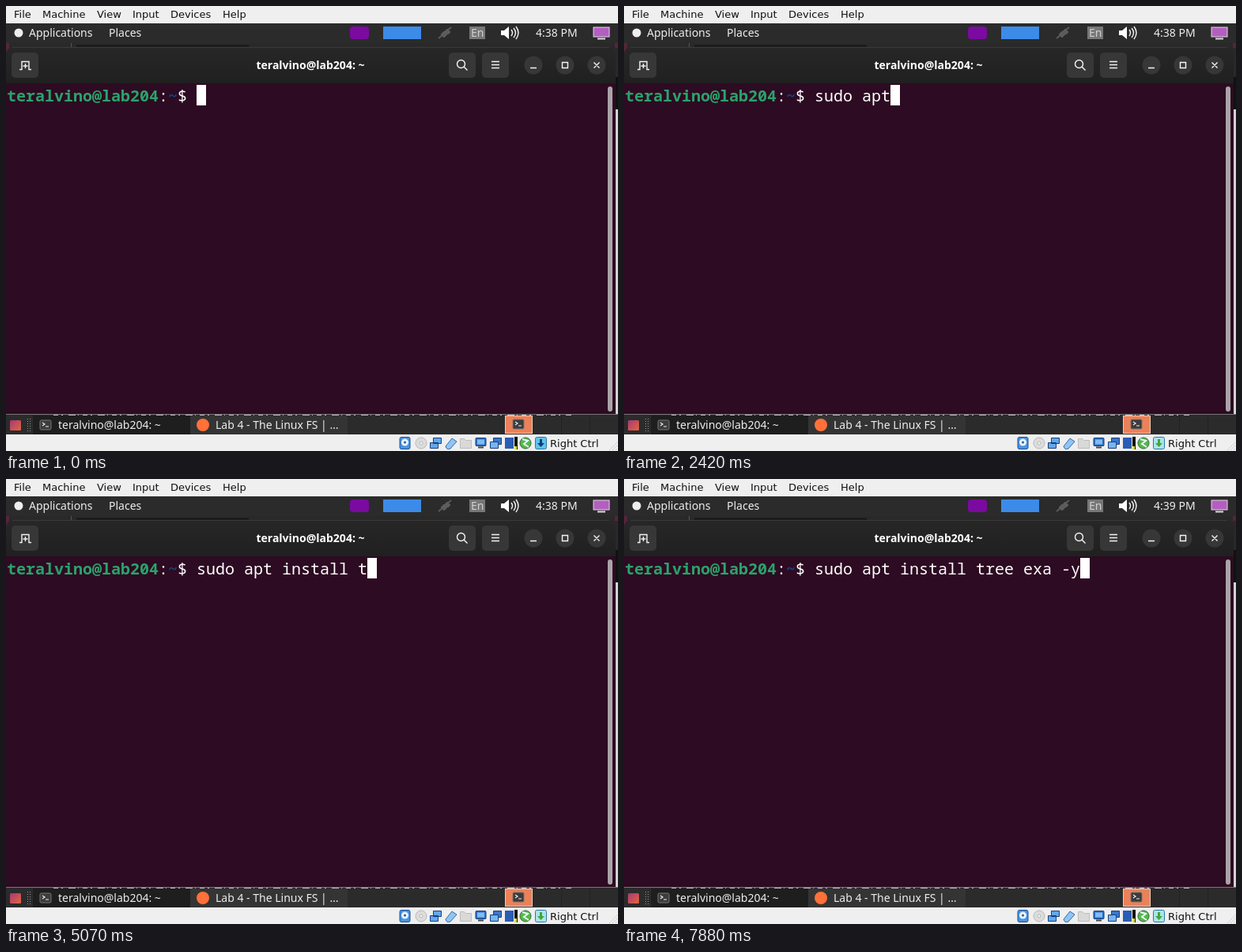
Write an HTML page that moves like this. It is 774 by 564 pixels and loops after 8 s.

```html
<!DOCTYPE html>
<html lang="en">
<head>
<meta charset="utf-8">
<title>Terminal session</title>
<style>
  html, body { margin: 0; width: 100%; height: 100%; overflow: hidden; background: #2b2b2b; }
  svg { display: block; width: 774px; height: 564px; }
  text { white-space: pre; }
  .menu { font: 13px "DejaVu Sans", sans-serif; fill: #111; }
  .panel { font: 14px "Noto Sans", sans-serif; fill: #ededed; }
  .title { font: bold 14px "Noto Sans", sans-serif; fill: #fff; text-anchor: middle; }
  .term { font: 20px "Noto Sans Mono", monospace; fill: #fff; }
  .line { fill: none; stroke: #f4f4f4; stroke-width: 1.4; }
</style>
</head>
<body>
<svg viewBox="0 0 774 564">
  <defs>
    <linearGradient id="bar" x2="0" y2="1">
      <stop stop-color="#272727"/><stop offset="1" stop-color="#202020"/>
    </linearGradient>
    <linearGradient id="desk" x2="1" y2="1">
      <stop stop-color="#a33a78"/><stop offset="1" stop-color="#e8643c"/>
    </linearGradient>
    <g id="shell">
      <rect width="14" height="12" rx="1.5" fill="#3c3c3c" stroke="#777"/>
      <path d="M3 3l3 2-3 2M7 8h4" fill="none" stroke="#eee" stroke-width="1.2"/>
    </g>
    <g id="screen">
      <rect x="1" y="1.5" width="13" height="10" rx="1" fill="#2f6fc4" stroke="#163c7a"/>
      <path d="M3 3.5h9v6H3z" fill="#7fbcf5"/>
      <path d="M4 13.5h7" stroke="#444" stroke-width="2"/>
    </g>
  </defs>

  <!-- host menu -->
  <rect width="774" height="22" fill="#efefef"/>
  <g class="menu" id="menu"></g>

  <!-- desktop panel -->
  <rect y="22" width="774" height="25" fill="#2b2b2b"/>
  <circle cx="16" cy="34" r="5.5" fill="#eee"/>
  <text class="panel" x="29" y="39">Applications</text>
  <text class="panel" x="130" y="39">Places</text>
  <rect x="435" y="26" width="24" height="16" rx="4" fill="#7b0aa0"/>
  <rect x="477" y="26" width="48" height="16" fill="#3c8be8"/>
  <g stroke="#5c5c5c" fill="#5c5c5c">
    <path d="M547 41l5-4M558 31l5-4" stroke-width="2"/>
    <path d="M550 36l4-4 4 4-4 4zM555 32l3-3 4 4-3 3z"/>
  </g>
  <rect x="586" y="26" width="20" height="16" fill="#777"/>
  <text class="panel" x="588" y="39" style="fill:#d0d0d0">En</text>
  <path d="M626 31h4l6-5v16l-6-5h-4z" fill="#fff"/>
  <path class="line" d="M639 30q3 4 0 8M642 28q5 6 0 12M645 26q6 8 0 16"/>
  <text class="panel" id="clock" x="670" y="39">4:38 PM</text>
  <rect x="743" y="27" width="20" height="12" fill="#b35fc0" stroke="#e5d5e8"/>
  <path d="M748 41.5h10" stroke="#ddd" stroke-width="2"/>

  <!-- windows behind -->
  <rect y="47" width="774" height="471" fill="#292929"/>
  <path d="M0 47h4v12H0zM770 47h4v6h-4z" fill="#56243c"/>
  <path d="M82.5 47v5" stroke="#555"/>
  <path d="M89 50.5h218" stroke="#171717" stroke-width="2"/>
  <path d="M771 90h3v41h-3z" fill="#111"/>
  <path d="M771 131h3v387h-3z" fill="#d4d2d4"/>

  <!-- terminal window -->
  <path d="M0 98V62Q0 52 10 52H761Q771 52 771 62V98z" fill="url(#bar)"/>
  <path d="M8 52.5H763" stroke="#3a3a3a"/>
  <g fill="#373737">
    <rect x="7" y="59" width="34" height="32" rx="5"/>
    <rect x="560" y="59" width="34" height="32" rx="5"/>
    <rect x="602" y="59" width="34" height="32" rx="5"/>
    <circle cx="667" cy="75" r="11.5"/><circle cx="707" cy="75" r="11.5"/><circle cx="747" cy="75" r="11.5"/>
  </g>
  <g class="line">
    <path d="M17 80.5h3v-10h9v10h3M24.5 73v6M21.5 76h6"/>
    <circle cx="575.5" cy="73.5" r="5"/><path d="M579 77l4.500 4.500"/>
    <path d="M614 70.500h10M614 74.500h10M614 78.500h10"/>
    <path d="M663 78.500h8M703.500 71.500h7v7h-7zM743.500 71.500l7 7M750.500 71.500l-7 7"/>
  </g>
  <text class="title" x="385" y="80">teralvino@lab204: ~</text>
  <rect y="98" width="771" height="420" fill="#2d0b22"/>
  <rect x="761" y="102" width="6" height="412" rx="3" fill="#aaa3a8"/>
  <text class="term" x="1" y="121"><tspan font-weight="bold" fill="#2aa36b">teralvino@lab204</tspan>:<tspan font-weight="bold" fill="#12488b">~</tspan>$</text>
  <text class="term" id="typed" x="241" y="121"></text>
  <rect id="caret" x="241" y="100" width="12" height="26" fill="#fff"/>

  <!-- taskbar -->
  <rect y="518" width="774" height="25" fill="#2b2b2b"/>
  <path d="M0 517.500h774" stroke="#777"/>
  <path d="M60 518.500h655" stroke="#bbb" stroke-dasharray="6 4 2 7 9 3 1 5"/>
  <rect x="5" y="525" width="14" height="13" rx="1.5" fill="url(#desk)"/>
  <path d="M27.500 523v16M30.500 523v16" stroke="#999" stroke-dasharray="1 2"/>
  <rect x="34" y="519" width="199" height="24" fill="#1e1e1e"/>
  <rect x="233" y="519" width="199" height="24" fill="#343434"/>
  <use href="#shell" x="43" y="525"/>
  <text class="panel" x="66" y="536">teralvino@lab204: ~</text>
  <circle cx="249" cy="531" r="8" fill="#ff7139"/>
  <text class="panel" x="265" y="536">Lab 4 - The Linux FS | …</text>
  <rect x="631.500" y="519.500" width="34" height="22" fill="#ec8158" stroke="#f6c9b4"/>
  <use href="#shell" x="641" y="524"/>
  <path d="M702.500 519v24M738.500 519v24" stroke="#222"/>

  <!-- host status bar -->
  <rect y="543" width="774" height="21" fill="#efefef"/>
  <g transform="translate(497 546)">
    <rect x="1" y=".5" width="13" height="15" rx="2" fill="#4a94e0" stroke="#1c4f96"/>
    <circle cx="7.500" cy="7" r="4.500" fill="#e9f3fd"/><circle cx="7.500" cy="7" r="1.500" fill="#28599a"/>
  </g>
  <circle cx="525" cy="554" r="7" fill="#dcdcdc" stroke="#b8b8b8"/>
  <circle cx="525" cy="554" r="2" fill="#f5f5f5" stroke="#b8b8b8"/>
  <g fill="#62a8ec" stroke="#173f7c">
    <path d="M540.500 547.500h10v7h-10zM536.500 553.500h10v7h-10z"/>
    <path d="M556 558l8-10 6 4-8 9q-5 2-6-3z" fill="#8ec5f4" stroke="#38699f"/>
  </g>
  <path d="M574.500 560.500v-12h5l2 2h7v10z" fill="#d9d9d9" stroke="#bdbdbd"/>
  <use href="#screen" x="593" y="546"/>
  <path d="M616.500 547.500h10v8h-10z" fill="#3b77cc" stroke="#173f7c"/>
  <path d="M612.500 552.500h10v8h-10z" fill="#76b5f0" stroke="#173f7c"/>
  <rect x="631" y="547" width="11" height="14" fill="#2a5db5"/>
  <rect x="643" y="546" width="4" height="16" fill="#111"/>
  <rect id="load" x="643" width="3" fill="#d8e032"/>
  <circle cx="657" cy="554" r="7" fill="#56b947" stroke="#2d6b39"/>
  <path d="M653 549l7 2-5 4 6 4" fill="none" stroke="#e8f6ff" stroke-width="2"/>
  <rect id="keys" x="669.500" y="546.500" width="14" height="15" rx="2" stroke="#2b78a5"/>
  <path id="arrow" d="M675 549h3v5h3l-4.500 5-4.500-5h3z"/>
  <text class="menu" x="688" y="559">Right Ctrl</text>
  <path d="M763 563l10-10M767 563l6-6M771 563l2-2" stroke="#aaa" stroke-dasharray="1 1.500"/>

  <g id="pointer">
    <path d="M-3-6h6M0-6V6M-3 6h6" stroke="#111" stroke-width="3"/>
    <path d="M-3-6h6M0-6V6M-3 6h6" stroke="#fff" stroke-width="1.200"/>
  </g>
</svg>
<script>
const LOOP = 8000;
const el = id => document.getElementById(id);

const menu = { File: 10, Machine: 46, View: 115, Input: 160, Devices: 208, Help: 274 };
el('menu').innerHTML = Object.entries(menu)
  .map(([label, x]) => `<text x="${x}" y="15">${label}</text>`).join('');

// Each key press with its time; "<" is backspace.
const presses = 'sudo apt install ree<<<tree exa -y';
const pressTimes = [
  1620, 1700, 1780, 1860, 1940, 2100, 2260, 2420, 2500,
  2660, 2740, 2890, 3050, 3210, 3290, 3450, 3530, 3690,
  3930, 4170, 4500, 4660, 4820, 5070, 5230, 5470,
  5630, 5870, 6030, 6190, 6430, 7010, 7250, 7640
];

// [time, x, y]
const path = [
  [330, 119, 470], [490, 160, 360], [570, 205, 255],
  [690, 245, 180], [810, 261, 147]
];

// [time, height of the processor meter]
const loads = [[0, 4], [1540, 7], [2340, 4], [3370, 8], [4010, 5], [7490, 9], [7880, 5]];

const lastBefore = (steps, t) => steps.filter(s => s[0] <= t).pop();

function typedAt(t) {
  let out = '';
  pressTimes.forEach((time, i) => {
    if (time > t) return;
    out = presses[i] === '<' ? out.slice(0, -1) : out + presses[i];
  });
  return out;
}

function draw(t) {
  const typed = typedAt(t);
  el('typed').textContent = typed;
  el('caret').setAttribute('x', 241 + typed.length * 12);
  el('caret').style.visibility = t >= 530 && t < 1130 ? 'hidden' : 'visible';

  const spot = t < 1540 && lastBefore(path, t);
  el('pointer').style.visibility = spot ? 'visible' : 'hidden';
  if (spot) el('pointer').setAttribute('transform', `translate(${spot[1]} ${spot[2]})`);

  const captured = t >= 970;
  el('keys').setAttribute('fill', captured ? '#a9e4ef' : '#5fc4ee');
  el('arrow').setAttribute('fill', captured ? '#45a72f' : '#103f70');

  const height = lastBefore(loads, t)[1];
  el('load').setAttribute('y', 562 - height);
  el('load').setAttribute('height', height);
  el('clock').textContent = t < 7410 ? '4:38 PM' : '4:39 PM';
}

const start = performance.now();
function tick() {
  draw((performance.now() - start) % LOOP);
  requestAnimationFrame(tick);
}
tick();
</script>
</body>
</html>
```
